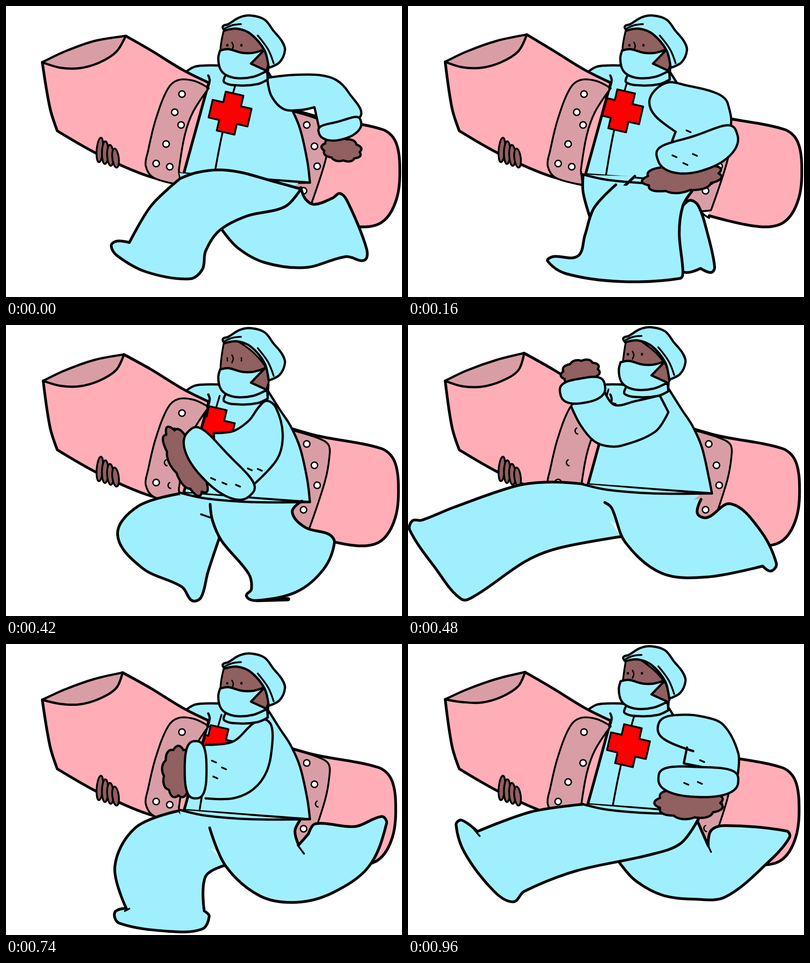
Recreate the animation shown at these times as an HTML page. Size 873x641 px, loop 1120 ms.

```html
<!DOCTYPE html>
<html lang="en">
<head>
<meta charset="utf-8">
<title>Running medic</title>
<style>
html, body { margin: 0; width: 100%; height: 100%; overflow: hidden; background: #fff; }
svg { display: block; width: 100%; height: 100%; }
path { stroke: #000; stroke-linecap: round; stroke-linejoin: round; }
</style>
</head>
<body>
<svg id="stage" viewBox="0 0 873 641"></svg>
<script>
const STEP = 160;
const BLUE = '#a0efff', PINK = '#ffaeb8', DUSK = '#d99ea5', SKIN = '#916060', RED = '#f00', NONE = 'none';

const path = (d, fill, width) => `<path d="${d}" fill="${fill}" stroke-width="${width}"/>`;
const polygon = pts => 'M' + pts.map(p => p.map(v => v.toFixed(1)).join(' ')).join('L') + 'Z';
const shift = (x, y, art) => `<g transform="translate(${x} ${y})">${art}</g>`;

const turn = (cx, cy, deg) => {
  const c = Math.cos(deg * Math.PI / 180), s = Math.sin(deg * Math.PI / 180);
  return (u, v) => [cx + u * c - v * s, cy + u * s + v * c];
};

// Smooth line through "x,y" points; "*" marks a corner, a final "z" closes the line.
function curve(text) {
  const words = text.trim().split(/\s+/);
  const closed = words.at(-1) === 'z';
  if (closed) words.pop();
  const pts = words.map(w => ({ xy: w.replace('*', '').split(',').map(Number), hard: w.endsWith('*') }));
  const n = pts.length;
  const at = i => closed ? pts[(i + n) % n] : pts[i];
  const gap = (p, q) => Math.hypot(q.xy[0] - p.xy[0], q.xy[1] - p.xy[1]);
  const handle = (i, len) => {
    const p = at(i), a = at(i - 1), b = at(i + 1);
    if (p.hard || !a || !b) return p.xy;
    const k = len / 3 / (gap(a, b) || 1);
    return p.xy.map((v, j) => (v + (b.xy[j] - a.xy[j]) * k).toFixed(1));
  };
  let d = 'M' + pts[0].xy;
  for (let i = 0; i < (closed ? n : n - 1); i++) {
    const len = gap(at(i), at(i + 1));
    d += `C${handle(i, len)} ${handle(i + 1, -len)} ${at(i + 1).xy}`;
  }
  return d;
}

const shape = (fill, width, text) => path(curve(text), fill, width);
const lines = (width, text) => text.split('|').map(t => shape(NONE, width, t)).join('');

// Ellipse that can be squared off, bent like a banana or scalloped like knuckles.
function blob([cx, cy, rx, ry, deg = 0], fill, width, { square = 1, bend = 0, bumps = 0 } = {}) {
  const place = turn(cx, cy, deg), pts = [];
  const round = v => Math.sign(v) * Math.abs(v) ** square;
  for (let i = 0; i < 90; i++) {
    const a = i / 90 * 2 * Math.PI;
    const swell = bumps ? 0.95 + 0.12 * Math.abs(Math.sin(a * bumps / 2)) : 1;
    const u = round(Math.cos(a)), v = round(Math.sin(a));
    pts.push(place(u * rx * swell, v * ry * swell + bend * (0.5 - u * u)));
  }
  return path(polygon(pts), fill, width);
}

function cross([cx, cy], w = 20, h = 44) {
  const pts = [];
  for (let q = 0; q < 4; q++) {
    const place = turn(cx, cy, 13 + q * 90);
    pts.push(place(-w, -h), place(w, -h), place(w, -w));
  }
  return path(polygon(pts), RED, 4);
}

const backTube = dx =>
  shift(dx, 0, shape(PINK, 6, '632,229* 690,245 826,272 854,297 864,350 857,425 825,476 770,486 660,462')) +
  shape(DUSK, 4, '632,232* 690,250 711,264 713,290 703,345 668,450* 610,440 632,300');

const frontTube = ([tx, ty], [lx, ly], sag) =>
  shape(PINK, 6, `${lx},${ly}* 97,225 113,275* 200,325 300,370 385,394* 447,169* 390,141 320,98 ${tx},${ty}* z`) +
  shape(DUSK, 5, `${lx},${ly}* 130,100 195,77 ${tx},${ty}* 243,${sag - 36} 205,${sag - 12} 162,${sag} 120,${sag - 1} z`) +
  shape(DUSK, 4, '447,181* 415,165 380,163 357,182 330,250 313,320 308,352 325,378 385,394* 381,362* 394,285 412,234 447,181* z');

const HOLES = { a: [388, 194], b: [372, 234], c: [386, 262], d: [353, 304], e: [331, 347], f: [361, 354],
                g: [663, 262], h: [680, 309], i: [686, 353], j: [656, 407] };

// Each hole is either punched through, a faint arc, or hidden.
const holes = (arcs, hidden) => Object.entries(HOLES).map(([key, [x, y]]) =>
  hidden.includes(key) ? '' :
  arcs.includes(key) ? path(`M${x} ${y - 7}a7 7 0 0 0 2 13`, NONE, 3) :
  blob([x, y, 7, 7], '#fff', 3)).join('');

const fingers = [0, 1, 2, 3].map(i =>
  blob([207 + 11.5 * i, 317 + 6 * i, 27 - 2 * i, 7, 95 - 4 * i], SKIN, 4)).join('');

const torso = (hem, [cx, cy]) =>
  shape(BLUE, 5, `393,148* 415,134 440,131 468,131* 575,141* 604,187 627,222 648,270 664,340 670,${hem + 21}* 382,${hem}*`) +
  lines(4, `${cx + 14},${cy - 70} ${cx - 16},${cy + 40} ${cx - 36},${hem + 12}`) +
  cross([cx, cy]);

const hemLine = hem => lines(5, `382,${hem}* 440,${hem + 13} 540,${hem + 21} 670,${hem + 21}`);

const seat = hem =>
  shape(BLUE, 0, `382,${hem}* 645,${hem + 22}* 600,${hem + 60}* 480,${hem + 98}* 400,${hem + 60}*`);

const folds = text => text.split(' ').filter(Boolean).map(p => {
  const [x, y] = p.split(',');
  return path(`M${x - 5} ${y - 2}l9 4`, NONE, 4);
}).join('');

function head({ cap, mask, eye, tall }) {
  const lean = mask / 5;
  const eyes = [488, 519].map(x => path(`M${x} ${86 + eye}v${tall ? 7 : 1}`, NONE, tall ? 3 : 5)).join('');
  return shift(lean, mask,
      shape(BLUE, 5, '484,153* 481,168 515,175 555,172 577,162* 576,146*') + lines(4, '579,130 577,162')) +
    shape(SKIN, 4, `480,${54 + cap}* 473,95 478,125 572,${146 + mask}* 580,110 550,65 510,${49 + cap}`) +
    shift(lean, 0, eyes + lines(3, `498,${80 + eye} 501,${88 + eye} 498,${97 + eye}`)) +
    shift(lean, mask, shape(BLUE, 5,
      '472,98* 490,95 520,103 546,103 571,95* 540,127* 575,143* 545,156 510,159 485,152 472,138 468,115 z')) +
    shift(lean, cap, shape(BLUE, 5,
      '482,54* 478,45 490,40 515,25 540,21 570,30 590,55 608,77 615,97 603,124 579,136* 570,98 540,62 510,50 z') +
      lines(4, '483,49 500,42 518,40|555,65 578,96 590,126'));
}

const LEVEL = { cap: 0, mask: 0, eye: 0 };
const RAISED = { cap: -14, mask: 0, eye: -14, tall: true };
const TURNED = { cap: -16, mask: -16, eye: -22 };

function medic(p) {
  const legs = seat(p.hem) + lines(9, p.sole || '0,-20 1,-20') +
    p.legs.map(t => shape(BLUE, 6, t)).join('') + lines(4, p.creases || '0,-20 1,-20');
  return backTube(p.tail) + torso(p.hem, p.cross) + frontTube(p.tip, p.lip, p.sag) +
    holes(p.arcs || '', p.hidden || '') + fingers + lines(5, '446,153 449,164 444,182') +
    (p.legsInFront ? hemLine(p.hem) + legs : legs + hemLine(p.hem)) +
    blob(p.hand, SKIN, 5, { bumps: 9 }) + shape(BLUE, 5, p.sleeve) +
    blob(p.cuff, BLUE, 5, { square: 0.72, bend: p.bend || 0 }) + folds(p.folds || '') + head(p.head);
}

const poses = [
  { tip: [264, 66], lip: [80, 124], sag: 137, tail: 4, hem: 368, cross: [494, 236], head: LEVEL, legsInFront: true,
    legs: ['650,400* 660,425 680,437 720,423 737,413 755,435 795,535 790,560 750,552 660,576 570,565 510,532 474,490*',
      '384,380* 420,367 470,361 520,367 585,385 650,403* 615,442 530,463 470,495 440,540 433,580 405,601 310,586 245,550 232,528 244,518 272,521* 320,440 384,380'],
    sleeve: '577,158* 630,152 690,152 728,163 755,190 780,245 690,268* 680,223* 650,229 612,227 585,198 576,160',
    cuff: [737, 270, 48, 20, -15], bend: 8, hand: [740, 316, 42, 25, 8] },

  { tip: [262, 63], lip: [82, 123], sag: 136, tail: 4, hem: 370, cross: [471, 231], head: LEVEL,
    legs: ['606,440* 622,428 640,440 660,500 676,575 668,587 645,578* 605,583 598,500',
      '386,372* 386,410 402,468* 500,375',
      '458,394* 410,445 390,505 374,551 320,552 308,562 350,590 470,607 600,600 606,585 598,500 606,440 626,408'],
    creases: '636,433 650,457 664,467',
    sleeve: '590,277* 545,242 532,212 545,185 575,168 610,174 680,192 705,215 704,275 600,300 582,298* 590,277',
    cuff: [640, 316, 92, 39, -18], bend: 16, hand: [605, 377, 84, 32, -6], folds: '588,331 633,328 612,348 619,276' },

  { tip: [260, 65], lip: [82, 123], sag: 135, tail: 1, hem: 369, cross: [457, 226], head: RAISED, arcs: 'bdf', hidden: 'c',
    legs: ['380,372* 290,400 246,462 300,535 388,577 410,607 430,600 445,545 470,470',
      '450,395* 455,430 475,475 535,548 541,582 530,597 550,607 640,588 700,538 724,480 712,461 660,446 631,412 652,388'],
    creases: '430,417 450,424', sole: '553,606 622,604',
    sleeve: '458,238* 500,234 535,211 558,180 575,167 595,182 610,240 598,295 542,355* 465,275 z',
    cuff: [467, 308, 98, 38, 46], bend: 12, hand: [396, 300, 80, 32, 62], folds: '457,339 482,349 512,354 538,318 560,319' },

  { tip: [256, 62], lip: [82, 123], sag: 136, tail: -1, hem: 350, cross: [428, 212], head: TURNED, arcs: 'bd', hidden: 'ac',
    legs: ['385,350* 315,346 240,354 100,402 30,430 10,431 4,452 60,535 118,604 150,595 260,520 330,492 470,466',
      '434,391* 449,403 480,480 560,547 660,555 782,531* 800,542 812,525 775,450 712,394 660,424 638,415 646,384'],
    sleeve: '360,180* 380,220 408,254 435,266 470,266 545,235 574,192* 555,155* 500,168 455,176 434,148',
    cuff: [385, 143, 50, 27, -10], bend: 3, hand: [380, 104, 41, 26, -10] },

  { tip: [257, 63], lip: [80, 123], sag: 133, tail: -5, hem: 365, cross: [461, 226], head: LEVEL, arcs: 'i', hidden: 'bc',
    legs: ['378,368* 285,405 240,490 265,582* 240,591 250,615 360,633 432,628 448,600 437,588* 440,512 485,487',
      '449,405* 485,490 560,555 640,569 720,548 800,490 839,395 828,380 770,402 682,396 667,418* 645,443* 637,412 647,390'],
    creases: '643,443 657,462|262,588 272,583',
    sleeve: '440,222* 500,215 545,175 570,166 585,180 587,220 575,280 545,320 500,340 440,340',
    cuff: [418, 277, 63, 24, 90], hand: [380, 282, 54, 34, 90], folds: '459,259 481,274 462,294' },

  { tip: [257, 61], lip: [82, 122], sag: 131, tail: -2, hem: 365, cross: [469, 228], head: RAISED, arcs: 'i', hidden: 'b',
    legs: ['546,582* 552,595 531,622 560,634 620,635 700,600 725,562 698,535*',
      '410,377* 320,422 296,460 350,545 520,583 650,560 756,491 740,474 611,446* 628,409 652,388'],
    creases: '612,440 640,445 668,444|645,391 557,453 558,483|554,462 592,463 611,448', sole: '610,633 679,622',
    sleeve: '576,236* 550,190 560,168 590,166 670,215 685,240 660,315 632,346* 535,282* 562,263 z',
    cuff: [568, 324, 66, 24, 27], bend: -4, hand: [525, 347, 60, 34, 25] },

  { tip: [258, 62], lip: [82, 122], sag: 129, tail: -2, hem: 352, cross: [486, 224], head: TURNED, arcs: 'j', hidden: 'bf',
    legs: ['465,480* 500,520 560,553 630,562 700,557 800,475 841,426 835,412 700,400 668,411 662,445* 638,390',
      '386,353* 270,370 153,413* 118,388 106,398 125,460 190,545 232,568 256,545 370,500 530,465 600,440 640,386'],
    creases: '661,443 668,458|146,409 158,423',
    sleeve: '629,236* 570,213 551,192 560,165 600,156 650,160 695,178 728,240 727,287* 608,263* 615,228',
    cuff: [640, 301, 88, 33, 2], bend: 6, hand: [620, 350, 72, 34], folds: '614,308 644,306 649,258' }
];

const stage = document.getElementById('stage');
stage.innerHTML = poses.map(p => `<g>${medic(p)}</g>`).join('');
const layers = [...stage.children];

function update(ms) {
  const now = Math.floor(ms / STEP) % layers.length;
  layers.forEach((g, i) => g.setAttribute('display', i === now ? 'inline' : 'none'));
}

const start = performance.now();
function loop() {
  update(performance.now() - start);
  requestAnimationFrame(loop);
}
loop();
</script>
</body>
</html>
```
